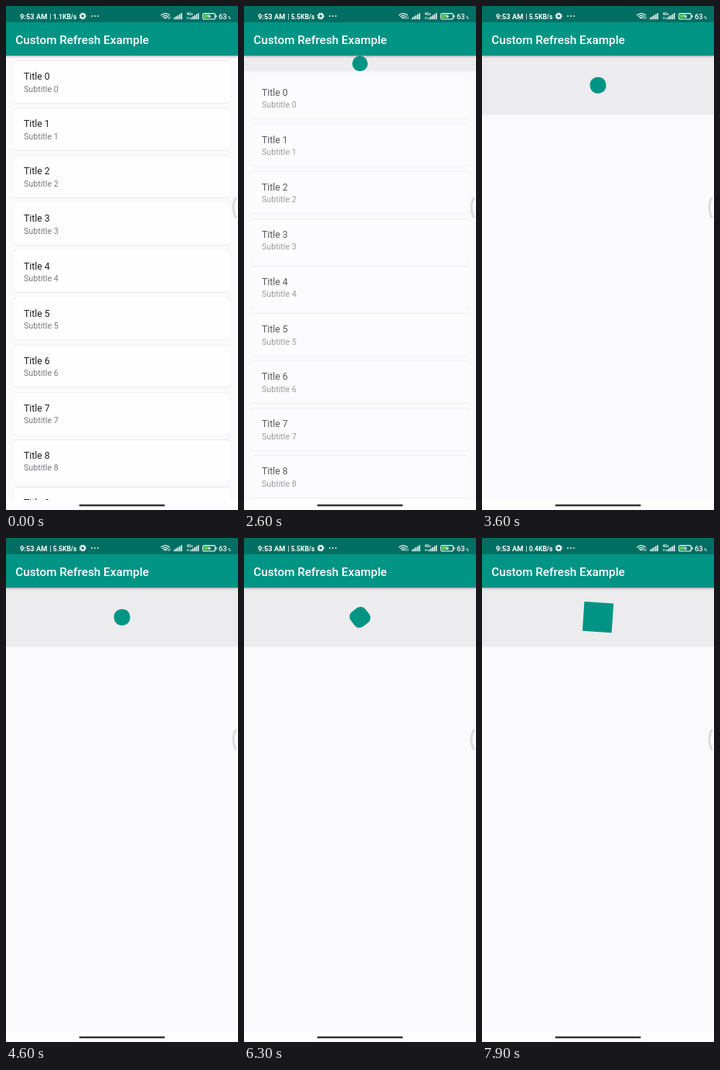
An HTML page that plays this animation: 300 px wide and 650 px high, repeating every 8 s.

```html
<!DOCTYPE html>
<html lang="en">
<head>
<meta charset="utf-8">
<title>Custom Refresh Example</title>
<style>
  html, body { margin: 0; width: 100%; height: 100%; overflow: hidden; background: #faf9fc; }
  svg { display: block; font-family: Roboto, sans-serif; }
  .card { fill: #fefdff; filter: drop-shadow(0 .8px .7px rgba(0, 0, 0, .3)); }
  .title { font-size: 12.2px; fill: #212121; }
  .subtitle { font-size: 10.7px; fill: #7a7a7c; }
  .bar { filter: drop-shadow(0 1.2px 1.5px rgba(0, 0, 0, .32)); }
  .status { fill: #fff; font-weight: 700; }
</style>
</head>
<body>
<svg width="300" height="650" viewBox="0 0 300 650">
  <defs>
    <clipPath id="body"><rect y="64" width="300" height="573"/></clipPath>
  </defs>
  <rect width="300" height="650" fill="#faf9fc"/>
  <g clip-path="url(#body)">
    <rect id="panel" y="64" width="300" fill="#ecebed"/>
    <g id="list"></g>
    <rect id="shape" fill="#009485"/>
  </g>
  <rect y="637" width="300" height="13" fill="#fefefe"/>
  <rect x="94.5" y="642.7" width="111" height="2.6" rx="1.3" fill="#333"/>
  <path d="M296.8 248Q291 260 296.8 272" fill="none" stroke="#dcdbdd" stroke-width="3" stroke-linecap="round"/>

  <rect class="bar" y="21" width="300" height="43" fill="#009485"/>
  <text x="12.2" y="48.6" font-size="15.3" font-weight="500" fill="#fff">Custom Refresh Example</text>

  <rect width="300" height="21" fill="#006e62"/>
  <g class="status">
    <text x="18" y="16.7" font-size="9.3">9:53 AM</text>
    <text id="speed" x="56.5" y="16.6" font-size="8.5"></text>
    <circle cx="99.2" cy="13" r="2.7" fill="none" stroke="#fff" stroke-width="1.8"/>
    <circle cx="99.2" cy="13" r="3.9" fill="none" stroke="#fff" stroke-width="1.2" stroke-dasharray="1.6 1.463"/>
    <circle cx="111" cy="13" r=".9"/><circle cx="114.9" cy="13" r=".9"/><circle cx="118.8" cy="13" r=".9"/>
    <g fill="none" stroke="#fff" stroke-width="1.3">
      <path d="M200.3 12Q206 7.2 211.7 12M202.2 14Q206 10.7 209.8 14M204 15.8Q206 14.2 208 15.8"/>
      <path d="M210 14.2v3M212 13.4v3" stroke-width=".8"/>
    </g>
    <g id="bars"></g>
    <text x="233.6" y="12.2" font-size="4.6">4G+</text>
    <path d="M234.5 14v3M236.5 14v3" stroke="#fff" stroke-width=".7"/>
    <rect x="254.6" y="9.6" width="15.8" height="7.4" rx="2" fill="none" stroke="#fff" stroke-width="1.1"/>
    <rect x="271.3" y="11.8" width="1.3" height="3" rx=".6"/>
    <rect x="256" y="11" width="8.5" height="4.6" rx=".8" fill="#5fd448"/>
    <path d="M263.8 9.8l-4 4h2.6l-1 3.2 4.4-4.2h-2.7z" stroke="#006e62" stroke-width=".5"/>
    <text x="274.9" y="16.6" font-size="9.4" font-weight="500">63</text>
    <text x="287" y="16.6" font-size="5.2">%</text>
  </g>
</svg>
<script>
const LOOP = 8000, PANEL = 76.4, PITCH = 61.1;
const SMALL = 20, LARGE = 38.2;
const PULL_START = 2500, PULL_TIME = 700;
const SPIN_START = 3600, SPIN_PERIOD = 1000, SPIN_PHASE = 488;

const $ = id => document.getElementById(id);
const set = (el, attrs) => {
  for (const name in attrs) el.setAttribute(name, attrs[name]);
};

$('list').innerHTML = Array.from({ length: 10 }, (_, i) => `
  <g transform="translate(0 ${70.6 + i * PITCH})">
    <rect class="card" x="11" width="278" height="54.6" rx="3"/>
    <text class="title" x="23" y="24.5">Title ${i}</text>
    <text class="subtitle" x="23" y="40">Subtitle ${i}</text>
  </g>`).join('');

// Two signal meters of five rising bars
$('bars').innerHTML = [217, 238.7].map(x =>
  Array.from({ length: 5 }, (_, i) => {
    const h = 2.4 + i * 1.4;
    return `<rect x="${x + i * 2.3}" y="${17.2 - h}" width="1.5" height="${h}"/>`;
  }).join('')).join('');

const clamp = x => Math.min(1, Math.max(0, x));
const easeOut = x => 1 - (1 - x) ** 2;
const easeInOut = x => x < .5 ? 4 * x ** 3 : 1 - 4 * (1 - x) ** 3;

// 0 is the small circle, 1 the large square
function morph(t) {
  if (t <= SPIN_START) return 0;
  const phase = (t - SPIN_PHASE) / SPIN_PERIOD % 1;
  return easeInOut(1 - Math.abs(2 * phase - 1));
}

function draw(t) {
  const pull = easeOut(clamp((t - PULL_START) / PULL_TIME));
  const height = PANEL * pull;
  set($('panel'), { height });
  set($('list'), { transform: `translate(0 ${height})`, opacity: 1 - pull });

  const p = morph(t), size = SMALL + (LARGE - SMALL) * p;
  set($('shape'), {
    x: -size / 2, y: -size / 2, width: size, height: size,
    rx: SMALL / 2 * (1 - p),
    opacity: pull > 0 ? 1 : 0,
    transform: `translate(150 ${64 + height / 2}) rotate(${180 * (1 - p)})`
  });

  const speed = t < 2200 ? '1.1' : t < 6600 ? '5.5' : '0.4';
  $('speed').textContent = `| ${speed}KB/s`;
}

function tick() {
  draw(performance.now() % LOOP);
  requestAnimationFrame(tick);
}
tick();
</script>
</body>
</html>
```
